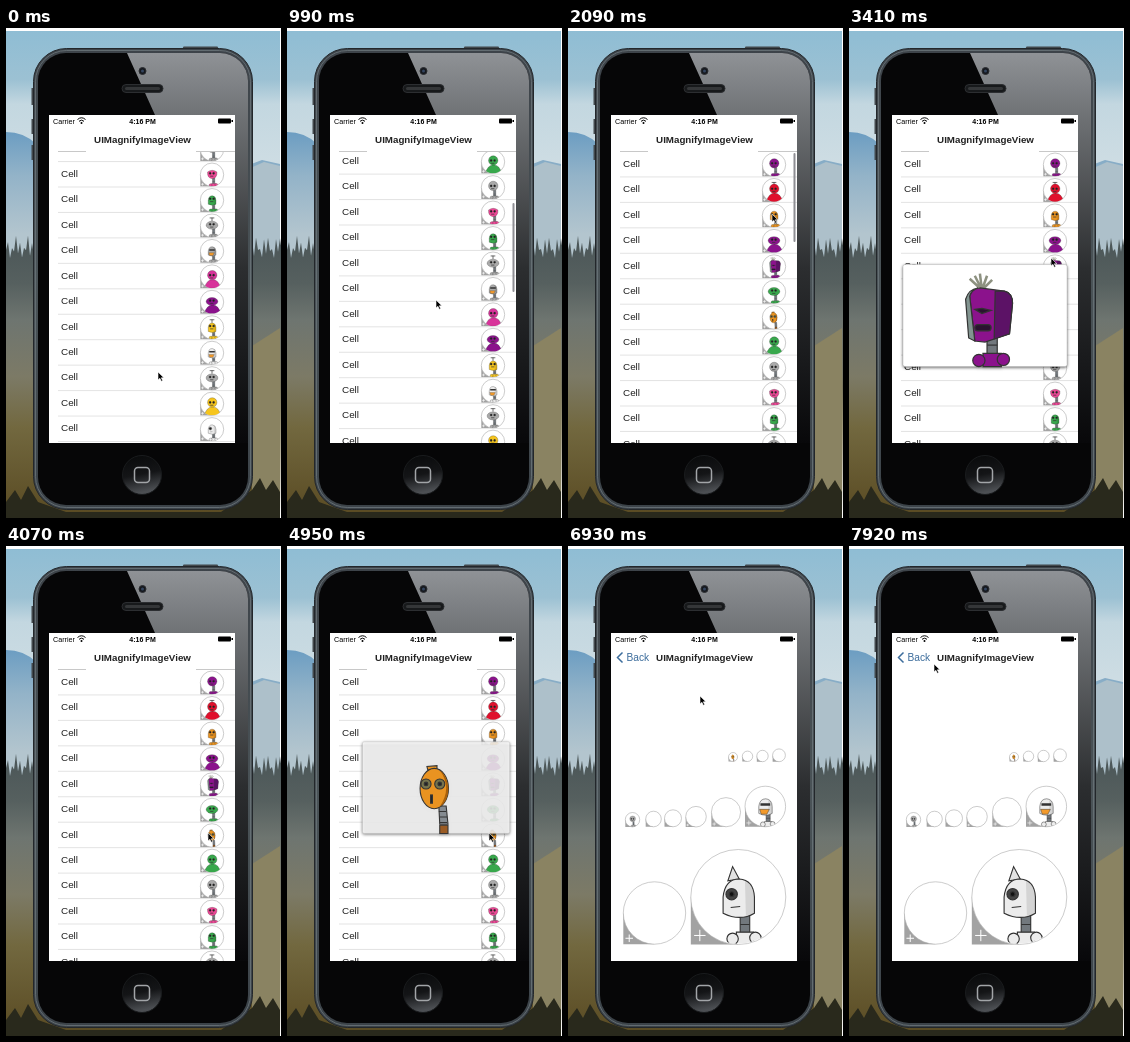
These frames come from a looping animation (275 by 490 pixels, 8 s). An HTML page:

```html
<!DOCTYPE html>
<html lang="en">
<head>
<meta charset="utf-8">
<title>UIMagnifyImageView</title>
<style>
html, body { margin: 0; width: 100%; height: 100%; overflow: hidden; background: #fff; }
svg { display: block; }
text { font-family: "Liberation Sans", Arial, sans-serif; fill: #222; }
.title { font-size: 9.75px; font-weight: bold; text-anchor: middle; }
.cell { font-size: 9.9px; }
.status { font-size: 7.2px; fill: #000; }
.pop { filter: drop-shadow(0 1px 1.5px #0009); }
</style>
</head>
<body>
<svg id="stage" width="275" height="490" viewBox="0 0 275 490">
  <defs>
    <linearGradient id="sky" x2="0" y2="1">
      <stop offset="0" stop-color="#8fbdd4"/><stop offset=".1" stop-color="#9cc1d3"/>
      <stop offset=".15" stop-color="#c3d7e0"/><stop offset=".3" stop-color="#d0dee4"/>
    </linearGradient>
    <linearGradient id="hill" x2="0" y2="1">
      <stop offset="0" stop-color="#6c9dc2"/><stop offset=".3" stop-color="#93b3c8"/>
      <stop offset=".7" stop-color="#b3c5ce"/>
    </linearGradient>
    <linearGradient id="land" x2="0" y2="1">
      <stop offset="0" stop-color="#4a5557"/><stop offset=".17" stop-color="#56605f"/>
      <stop offset=".3" stop-color="#6e7570"/><stop offset=".5" stop-color="#7c7a66"/>
      <stop offset=".68" stop-color="#72683f"/><stop offset="1" stop-color="#594a22"/>
    </linearGradient>
    <linearGradient id="rim" x2="0" y2="1">
      <stop offset="0" stop-color="#3d4349"/><stop offset=".5" stop-color="#4a5357"/>
      <stop offset="1" stop-color="#3b4248"/>
    </linearGradient>
    <linearGradient id="gloss" x2="0" y2="1">
      <stop offset="0" stop-color="#8f9296"/><stop offset=".16" stop-color="#6f7275"/>
      <stop offset=".55" stop-color="#2c2e30"/><stop offset="1" stop-color="#08080a"/>
    </linearGradient>
    <linearGradient id="button" x2=".2" y2="1">
      <stop offset="0" stop-color="#08090a"/><stop offset=".55" stop-color="#141517"/>
      <stop offset="1" stop-color="#4c4f53"/>
    </linearGradient>
    <clipPath id="disc"><circle cx="50" cy="50" r="49"/></clipPath>
    <clipPath id="face"><rect x="32" y="25" width="210" height="452" rx="28"/></clipPath>
  </defs>

  <g id="scene">
    <rect y="3" width="274" height="487" fill="url(#sky)"/>
    <path d="M0 104Q18 104 30 116L240 138 256 132 274 136V250H0z" fill="url(#hill)"/>
    <path d="M140 150L240 142 258 134 274 138V250H140z" fill="#adc0ca"/>
    <path id="trees" fill="url(#land)"/>
    <path d="M246 318L274 300V465H246z" fill="#8a8362"/>
    <path d="M0 474L9 462 15 472 22 458 32 474 60 484H215L246 462 254 450 260 462 267 452 274 464V490H0z" fill="#29291c"/>
  </g>

  <g id="phone">
    <path d="M26.500 60V77M26.500 91V106M26.500 117V132" stroke="#42484c" stroke-width="2"/>
    <rect x="177" y="18.500" width="35" height="4" rx="1" fill="#42484c"/>
    <rect x="27.500" y="20.500" width="219" height="461" rx="33" fill="url(#rim)" stroke="#23272b"/>
    <rect x="29.500" y="22.500" width="215" height="457" rx="31" fill="none" stroke="#6d777b" stroke-width=".8"/>
    <rect x="32" y="25" width="210" height="452" rx="28" fill="#060607"/>
    <path d="M121 25L149 87 229 87V415H242V25z" fill="url(#gloss)" clip-path="url(#face)"/>
    <circle cx="136.500" cy="43" r="3.500" fill="#15181d" stroke="#2b2d31"/>
    <circle cx="136.500" cy="43" r="1.500" fill="#34455f"/>
    <rect x="116" y="56.500" width="41" height="8" rx="4" fill="#17191b" stroke="#2c2e31"/>
    <rect x="119" y="59" width="35" height="3" rx="1.500" fill="#343638"/>
    <circle cx="136" cy="447" r="19.500" fill="url(#button)" stroke="#191b1d"/>
    <rect x="128.500" y="439.500" width="15" height="15" rx="3.500" fill="none" stroke="#a2a5a8" stroke-width="1.500"/>
  </g>

  <svg x="43" y="87" width="186" height="328" viewBox="43 87 186 328">
    <rect x="43" y="87" width="186" height="328" fill="#fff"/>
    <g id="list">
      <g id="rows"></g>
      <rect id="bar" x="225.500" width="2" height="89" rx="1" fill="#8e8e93"/>
      <g id="pop" class="pop">
        <rect id="popBack" x="-82" y="-51" width="164" height="102" rx="2" fill="#fff" stroke="#bbb" stroke-width=".5"/>
        <g id="popBot" transform="translate(-51 -51) scale(1.02)"></g>
      </g>
      <rect id="dim" x="43" y="123" width="186" height="292"/>
    </g>
    <g id="detail"></g>
    <rect x="43" y="87" width="186" height="36" fill="#fff"/>
    <path id="rule" d="M52 123.500H80M190 123.500H229" stroke="#c8c8c8"/>
    <text id="oldTitle" class="title" y="114.500">UIMagnifyImageView</text>
    <text id="newTitle" class="title" y="114.500">UIMagnifyImageView</text>
    <g id="back">
      <path d="M54.500 106.500L49.500 111.500 54.500 116.500" fill="none" stroke="#3d6d9c" stroke-width="1.500"/>
      <text id="backText" y="115" font-size="10.200" style="fill:#3d6d9c">Back</text>
    </g>
    <text class="status" x="47" y="95.500">Carrier</text>
    <path d="M71.500 91.500Q75.500 88 79.500 91.500M73 93.300Q75.500 91 78 93.300" fill="none" stroke="#000"/>
    <circle cx="75.500" cy="95" r="1"/>
    <text class="status" x="136.500" y="95.500" text-anchor="middle" font-weight="bold" style="font-size:7px">4:16 PM</text>
    <rect x="212" y="90.500" width="13" height="5" rx="1"/><rect x="225.500" y="92" width="1.500" height="2"/>
  </svg>
  <path id="cursor" d="M0 0V8L1.900 6.300 3.300 9.300 4.700 8.700 3.300 5.800H5.900z" fill="#000" stroke="#fff" stroke-width=".6"/>
</svg>

<script>
const $ = id => document.getElementById(id);
const clamp = v => Math.min(1, Math.max(0, v));
const lerp = (a, b, p) => a + (b - a) * p;
const smooth = p => p * p * (3 - 2 * p);
const move = (id, x, y, s = 1) => $(id).setAttribute('transform', `translate(${x} ${y}) scale(${s})`);
const fade = (id, v) => $(id).setAttribute('opacity', v);

// Value of a track [[time, v...], ...] at time t
function track(keys, t) {
  const i = keys.findIndex(k => k[0] > t);
  if (i < 0) return keys.at(-1).slice(1);
  const a = keys[i - 1], b = keys[i];
  const p = smooth((t - a[0]) / (b[0] - a[0]));
  return a.slice(1).map((v, j) => lerp(v, b[j + 1], p));
}

// Robots live in a 100 x 100 box
const heads = {
  egg: '<path d="M41 31L40 27 51 26 51 31z"/><ellipse cx="48" cy="51" rx="15.500" ry="22"/>',
  box: '<path d="M35 31Q37 24 45 23L69 26Q77 28 77 38L74 68 50 76 40 75z"/>',
  dome: '<path d="M34 67V50Q36 31 51 31 66 32 67 50V67Q52 76 34 67z"/>',
  round: '<circle cx="51" cy="44" r="20"/>',
  wide: '<ellipse cx="50" cy="48" rx="25" ry="17"/>',
  cup: '<path d="M31 38Q51 24 71 38 73 64 51 67 29 64 31 38z"/>'
};
// Shaded parts over a head
const shades = {
  box: '<path d="M60 26L69 26Q77 28 77 38L74 68 59 73z" fill="#5c1266"/><path d="M35 31Q37 24 43 23 34 24 31 34L34 72 40 75z" fill="#829490"/>',
  dome: '<path d="M57 33Q66 36 66.500 50V67L58 70z" fill="#000" opacity=".1" stroke="none"/>',
  egg: '<path d="M54 31Q68 50 54 71 63 66 63.500 51 62 36 54 31z" fill="#a85f08" stroke="none"/>'
};
const tops = {
  tuft: '<path d="M47 25L35 14M47 25L40 11M47 25L45 9M47 25L52 11M47 25L57 15" stroke="#8d9180" stroke-width="2.500"/>',
  cone: '<path d="M39 33L44 18 51 31z" fill="#e2e2e2"/>',
  rod: '<path d="M50 30V16M40 17H60" stroke-width="3"/>'
};
const eyesOf = {
  rings: '<g fill="#75734c"><circle cx="39" cy="46" r="5.500"/><circle cx="54" cy="46" r="5.500"/></g><g fill="#222"><circle cx="39" cy="46" r="2"/><circle cx="54" cy="46" r="2"/><rect x="44" y="58" width="2" height="9"/></g>',
  slots: '<path d="M40 44L47 43 56 45 47 48z" fill="#2b1230"/><rect x="40" y="59" width="16" height="6" rx="3" fill="#2b1230"/>',
  one: '<circle cx="43" cy="47" r="6" fill="#444"/><circle cx="43" cy="47" r="2.500" fill="#111"/><path d="M42 61L52 60"/>',
  two: '<g fill="#222"><circle cx="42" cy="44" r="4.500"/><circle cx="57" cy="44" r="4.500"/></g><path d="M42 56H56" stroke-width="3"/>',
  beak: '<path d="M38 45H62" stroke-width="6"/><path d="M36 57H60L54 69H40z" fill="#f39a2b"/>'
};
function bodyOf(color, head, broad) {
  if (broad) return `<path d="M16 100Q28 63 52 62 78 63 88 100z" fill="${color}"/>`;
  if (head === 'egg') return '<path d="M53 70H61L63 90H54z" fill="#858b91"/><path d="M53 76H61M54 82H62M54 88H62"/><path d="M54 91H63V100H54z" fill="#9a5a22"/>';
  return `<path d="M52 62H62V88H52z" fill="#72787d"/><path d="M52 79H62"/>
    <path d="M48 100V87H66V100z" fill="${color}"/><circle cx="44" cy="94" r="6" fill="${color}"/><circle cx="68" cy="93" r="6" fill="${color}"/>`;
}
const bot = ([color, head, eyes, top, broad]) =>
  `<g stroke="#333" stroke-width="1.200">${bodyOf(color, head, broad)}${tops[top] || ''}
  <g fill="${color}">${heads[head]}</g>${shades[head] || ''}${eyesOf[eyes]}</g>`;

const purple = '#8b128c', green = '#38a84c', orange = '#ea931f', gray = '#aaaaaa',
  pink = '#ee4796', magenta = '#d8339a', yellow = '#f6c51d', white = '#ececec', red = '#e0102c';
const bots = [
  [purple, 'round', 'two'], [red, 'round', 'two', 'rod', 1], [orange, 'dome', 'two'],
  [purple, 'wide', 'two', '', 1], [purple, 'box', 'slots', 'tuft'], [green, 'wide', 'two'],
  [orange, 'egg', 'rings'], [green, 'round', 'two', '', 1], [gray, 'round', 'two'],
  [pink, 'cup', 'two'], [green, 'dome', 'two'], [gray, 'wide', 'two', 'rod'],
  [gray, 'dome', 'beak'], [magenta, 'round', 'two', '', 1], [purple, 'wide', 'two', '', 1],
  [yellow, 'dome', 'two', 'rod'], [white, 'dome', 'beak'], [gray, 'wide', 'two', 'rod'],
  [yellow, 'round', 'two', '', 1], [white, 'dome', 'one']
];
const bigBot = [white, 'dome', 'one', 'cone'];

// Circle with a gray lower left corner, optionally holding a robot
function badge(x, y, r, spec) {
  const plus = r > 10
    ? `<path d="M${x - r * .93} ${y + r * .81}h${r * .24}M${x - r * .81} ${y + r * .69}v${r * .24}" stroke="#fff" stroke-width="${r > 25 ? 1 : .6}"/>` : '';
  const inner = spec
    ? `<g transform="translate(${x - r} ${y - r}) scale(${r / 50})" clip-path="url(#disc)">${bot(spec)}</g>` : '';
  return `<path d="M${x - r} ${y}v${r}h${r}z" fill="#a2a2a2"/>
    <circle cx="${x}" cy="${y}" r="${r}" fill="#fff" stroke="#aaa" stroke-width=".6"/>${inner}${plus}`;
}

const top0 = 123.5, rowH = 25.45;
const rowY = i => top0 + rowH * (i + .5);
$('rows').innerHTML = `<rect id="tap" x="43" y="${top0}" width="186" height="${rowH}" fill="#d4d4d4"/>` +
  bots.map((spec, i) => `<text class="cell" x="55" y="${rowY(i) + 2.6}">Cell</text>
    ${badge(206, rowY(i) + .5, 11.7, spec)}
    <path d="M52 ${top0 + rowH * (i + 1)}H229" stroke="#dcdcdc" stroke-width=".8"/>`).join('');

const badges = [
  [165, 211, 4.5, bots[6]], [179.5, 210.3, 5.2], [194.5, 210, 5.7], [211, 209.3, 6.4],
  [64.5, 273.7, 7.2, bots[8]], [85.5, 273, 7.8], [105, 272.3, 8.5], [128, 270.7, 10.3],
  [158, 266.2, 14.6], [197.3, 260.5, 20.3, bots[16]],
  [86.5, 367, 31.2], [170.3, 351, 47.5, bigBot]
];
$('detail').innerHTML = '<rect x="43" y="87" width="186" height="328" fill="#fff"/>' +
  badges.map(b => badge(...b)).join('');

// Jagged treeline at both sides
let ridge = 'M0 490V222';
for (let x = 0; x < 274; x += 4)
  ridge += `L${x + 2} ${214 + 7 * Math.sin(x * 2.1)}L${x + 4} ${226 + 4 * Math.cos(x)}`;
$('trees').setAttribute('d', ridge + 'L274 490z');

const cursorKeys = [
  [0, 152, 344], [330, 152, 344], [760, 149, 234], [990, 149, 272], [1250, 149, 320],
  [1420, 149, 320], [1980, 204, 186], [2750, 204, 186], [3100, 202, 230], [3630, 202, 230],
  [4080, 202, 287], [4960, 202, 287], [5600, 157, 140], [5750, 157, 140], [6160, 156, 170],
  [6600, 156, 170], [6930, 132, 150], [7590, 132, 150], [7900, 85, 118]
];
const indicatorKeys = [[0, 0], [750, 0], [850, 1], [2150, 1], [2450, 0]];
const popups = [
  { row: 2, open: 2150, close: 2770, dir: 1 },
  { row: 4, open: 3110, close: 3650, dir: 1 },
  { row: 6, open: 4100, close: 4850, dir: -1 }
];
popups.forEach(p => p.art = bot(bots[p.row]));
let shown;

function scrollAt(t) {
  if (t < 760) return 219;
  if (t < 1250) return 219 - (track(cursorKeys, t)[1] - 234);
  return 133 * (1 - clamp((t - 1250) / 700)) ** 2;
}

function drawPopup(t) {
  const p = popups.find(p => t >= p.open && t < p.close + 300);
  $('pop').style.display = p ? '' : 'none';
  if (!p) return;
  if (shown !== p) { shown = p; $('popBot').innerHTML = p.art; }
  // 0 is fully open, 1 is back at the thumbnail
  const e = t < p.close ? (1 - clamp((t - p.open) / 300)) ** 2 : clamp((t - p.close) / 300) ** 2;
  const s = lerp(1, .1, e);
  move('pop', lerp(136, 206, e ** .77), rowY(p.row) + p.dir * 51 * s - 1.5, s);
  fade('popBack', clamp(1 - e * 1.6));
  fade('popBot', 1 - e * e);
}

function draw(t) {
  const scroll = scrollAt(t);
  move('rows', 0, -scroll);
  move('bar', 0, 125 + scroll * .276);
  fade('bar', track(indicatorKeys, t)[0]);
  drawPopup(t);

  const rest = (1 - clamp((t - 5780) / 500)) ** 2.7;
  const p = 1 - rest;
  fade('tap', t > 5680 ? 1 : 0);
  move('list', -56 * p, 0);
  fade('dim', .1 * p);
  move('detail', 186 * rest, 0);
  fade('rule', rest);
  move('oldTitle', 136.5 - 60 * p, 0);
  fade('oldTitle', p ? clamp(1 - p * 1.5) : 1);
  move('newTitle', 136.5 + 60 * rest, 0);
  fade('newTitle', p ? clamp(p * 1.5 - .5) : 0);
  fade('back', clamp((t - 5950) / 300));
  move('backText', 58.5 + 60 * rest, 0);

  move('cursor', ...track(cursorKeys, t));
}

function frame(now) {
  draw(now % 8000);
  requestAnimationFrame(frame);
}
draw(0);
requestAnimationFrame(frame);
</script>
</body>
</html>
```
